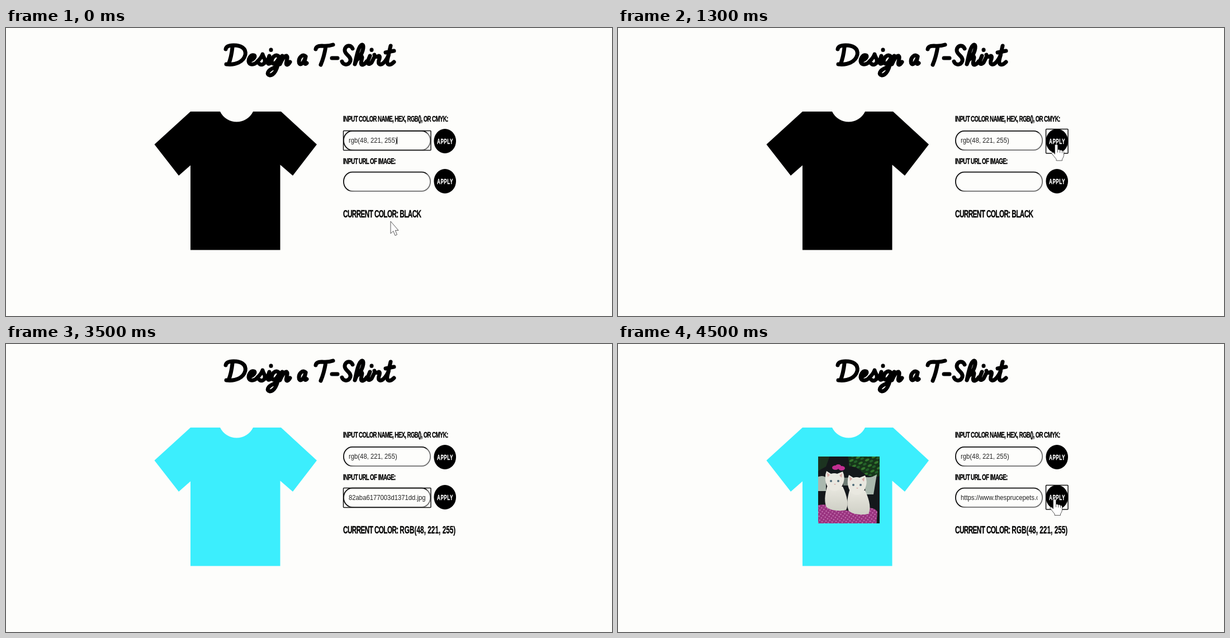
Recreate the animation shown at these times as an HTML page. Size 1084 by 517 pixels, loop 4.8 s.

```html
<!DOCTYPE html>
<html lang="en">
<head>
<meta charset="utf-8">
<title>Design a T-Shirt</title>
<style>
  html, body { margin: 0; width: 100%; height: 100%; overflow: hidden; background: #fdfdfb; }
  svg { display: block; width: 1084px; height: 517px; }
  text { white-space: pre; }
  .display { font: bold 15.5px "Liberation Sans", Arial, sans-serif; letter-spacing: -.06em; stroke: #000; stroke-width: .35; }
  .display .status { font-size: 18.85px; }
  .display .digits { letter-spacing: .005em; }
  .apply { font: bold 13px "Liberation Sans", Arial, sans-serif; letter-spacing: .07em; fill: #fff; stroke: #fff; stroke-width: .35; text-anchor: middle; }
  .value { font: 12.5px "Liberation Sans", Arial, sans-serif; fill: #222; }
  .lettering { fill: none; stroke: #000; stroke-width: 7; stroke-linecap: round; stroke-linejoin: round; }
  .field { fill: none; stroke: url(#inset); stroke-width: 1.8; }
  .focus { fill: none; stroke: #111; stroke-width: 1.5; }
  .caret { stroke: #000; stroke-width: 1; }
  .pointer { fill: #fff; stroke: #444; stroke-width: .9; stroke-linejoin: round; }
</style>
</head>
<body>
<svg viewBox="0 0 1084 517">
  <defs>
    <linearGradient id="inset" x1="0" y1="0" x2="1" y2="1">
      <stop offset=".5" stop-color="#0c0c0c"/>
      <stop offset=".56" stop-color="#6c6c6c"/>
    </linearGradient>
    <linearGradient id="fur" x1="0" y1="0" x2="0" y2="1">
      <stop offset="0" stop-color="#e9e8e0"/>
      <stop offset="1" stop-color="#cfd0c6"/>
    </linearGradient>
    <pattern id="weave" width="5" height="5" patternUnits="userSpaceOnUse" patternTransform="rotate(35)">
      <rect width="5" height="5" fill="#99337f"/>
      <circle cx="2" cy="2" r="1.200" fill="#c673b2"/>
    </pattern>
    <pattern id="leaves" width="13" height="11" patternUnits="userSpaceOnUse" patternTransform="rotate(-25)">
      <rect width="13" height="11" fill="#16351a"/>
      <ellipse cx="4" cy="3" rx="4" ry="2" fill="#347a2e"/>
      <ellipse cx="10" cy="8" rx="3.500" ry="2" fill="#23612a"/>
    </pattern>
    <filter id="soft"><feGaussianBlur stdDeviation=".7"/></filter>
    <clipPath id="photoClip"><rect x="358" y="202" width="110" height="120"/></clipPath>
    <clipPath id="valueClip"><rect x="612" y="260" width="138.500" height="32"/></clipPath>
  </defs>

  <g class="lettering" role="img" aria-label="Design a T-Shirt">
    <path d="M405 35Q403 53 398 65M393 38Q394 31 407 31C421 31 430 37 428 48C425 61 410 67 394 65"/>
    <path d="M435 59C443 57 448 50 443 49C438 48 434 54 434 60C435 67 444 67 450 60"/>
    <path d="M450 60Q457 53 459 47C460 53 466 57 462 63C459 67 455 66 453 64M462 63Q467 61 470 55"/>
    <path d="M471 50L468 60Q468 68 475 61M474 39v.5"/>
    <path d="M488 51C482 46 475 53 475 60C476 67 484 65 489 52C487 67 483 84 472 85C465 84 468 76 478 72Q485 69 489 63"/>
    <path d="M494 50L490 65Q497 49 502 50C506 53 498 65 503 66Q506 65 508 61"/>
    <path d="M536 51C530 46 524 53 524 60C524 68 531 67 536 52L534 60Q534 67 538 63"/>
    <path d="M554 38Q555 32 565 32Q577 33 585 30M572 33Q569 52 563 66M583 54H593"/>
    <path d="M620 37C617 29 607 31 606 39C605 48 618 50 616 59C613 68 603 67 601 60"/>
    <path d="M627 58C638 48 642 31 637 30C631 31 627 50 624 65C629 51 636 47 637 53C636 59 633 66 638 66Q642 65 645 60"/>
    <path d="M651 50L647 60Q647 68 654 62L659 52M654 39v.5"/>
    <path d="M659 48Q661 54 667 50Q670 51 667 58Q665 67 672 65Q678 62 684 50"/>
    <path d="M688 32L682 58Q681 68 689 65Q692 63 694 61M679 44Q688 42 694 41"/>
  </g>

  <path id="shirt" d="M330 150H383A32.800 32.800 0 0 0 442 150H492L556 209L513 265L490.500 245.500V398.500H330V246.500L309 265L265.500 209Z"/>

  <g clip-path="url(#photoClip)" data-on="4500 4800">
    <path fill="#14181b" d="M358 202h110v120h-110z"/>
    <g filter="url(#soft)">
      <path fill="url(#leaves)" d="M411 198h62v38q-24 6-36-6t-23-10z"/>
      <path fill="#1c3320" d="M354 198h26l-8 22-18 10z"/>
      <g fill="#c22f92">
        <ellipse cx="389" cy="222" rx="6" ry="4"/>
        <ellipse cx="400" cy="223" rx="6" ry="4"/>
        <ellipse cx="394" cy="219" rx="5" ry="3"/>
      </g>
      <path fill="#aab8ae" d="M354 240q12-6 18 0v24h-18zM440 238q12 4 23-4l-6 36h-14z"/>
      <path fill="#6f7c74" d="M403 240h10v14h-10z"/>
      <path fill="url(#weave)" d="M354 290q18-5 32 4 34 10 58 1 14-3 20 6l-2 26h-108z"/>
      <g id="kitten">
        <path fill="url(#fur)" d="M374 256q-7 24-1 37 13 9 35 5 7-14-6-42z"/>
        <path fill="#e9e8e0" d="M371 245q-1-10 2-17l8 5q6-2 11 0l10-4q4 8 2 17-4 17-17 18-13-1-16-19z"/>
        <path fill="#d6aaa6" d="M374 231l5 4-4 4zM401 232l-5 4 4 4zM386 251h4l-2 2z"/>
        <g fill="#4e6a78"><circle cx="381" cy="246" r="2"/><circle cx="394" cy="246" r="2"/></g>
      </g>
      <use href="#kitten" x="40" y="7"/>
    </g>
  </g>

  <g transform="translate(603 0) scale(.622 1)" class="display">
    <text y="168.500">INPUT COLOR NAME, HEX, RGB(), OR CMYK:</text>
    <text y="244.500">INPUT URL OF IMAGE:</text>
    <text y="340.500" class="status" data-on="0 1500">CURRENT COLOR: BLACK</text>
    <text y="340.500" class="status" data-on="1500 4800">CURRENT COLOR: <tspan class="digits">RGB(48, 221, 255)</tspan></text>
  </g>

  <rect class="field" x="603.900" y="184.900" width="155.200" height="34.200" rx="15.500" ry="17"/>
  <rect class="field" x="603.900" y="258.600" width="155.200" height="34.200" rx="15.500" ry="17"/>
  <ellipse cx="785.200" cy="203" rx="19.800" ry="22"/>
  <ellipse cx="785.200" cy="275" rx="19.800" ry="22"/>
  <g transform="translate(785.500 0) scale(.622 1)" class="apply">
    <text y="207.600">APPLY</text>
    <text y="279.600">APPLY</text>
  </g>

  <g transform="translate(613 0) scale(.905 1)" class="value">
    <text y="206.300">rgb(48, 221, 255)</text>
  </g>
  <g clip-path="url(#valueClip)">
    <g transform="translate(613 0) scale(.905 1)" class="value">
      <text y="279.800" data-on="2800 4300">82aba6177003d1371dd.jpg</text>
      <text y="279.800" data-on="4300 4800">https://www.thesprucepets.com</text>
    </g>
  </g>

  <path class="caret" d="M699.500 195.500v13" data-on="0 800"/>
  <path class="caret" d="M613.500 269v13.500" data-on="2600 2800"/>
  <path class="caret" d="M750.500 269v13.500" data-on="2800 3500"/>

  <rect class="focus" x="603.500" y="184.500" width="156.500" height="35" rx="1" data-on="0 1300"/>
  <rect class="focus" x="765.500" y="181.500" width="39.500" height="43.500" rx="1" data-on="1300 2600"/>
  <rect class="focus" x="603.500" y="258.500" width="156.500" height="35" rx="1" data-on="2600 4300"/>
  <rect class="focus" x="765.500" y="253.500" width="39.500" height="43.500" rx="1" data-on="4300 4800"/>

  <path id="arrow" class="pointer" d="M0 0V22L4.800 17.500L8 25.500L11.500 24L8.300 16.300H14Z"/>
  <g id="hand" class="pointer">
    <path d="M-2.500 2Q0-1.500 2.500 2V10Q5 8.500 6.500 11Q9 9.500 10.500 12Q13 11 13.500 14V20Q13 24 10.500 27V29.500H0V27Q-4 22-8.500 16.500Q-7.500 13.500-4.500 15.500L-2.500 18Z"/>
    <path fill="none" d="M2.500 10v5M6.500 11v4.500M10.500 12v4"/>
  </g>
</svg>
<script>
  const LOOP = 4800;
  const byId = id => document.getElementById(id);
  const shirt = byId('shirt');
  const pointers = { arrow: byId('arrow'), hand: byId('hand') };

  // time, pointer, tip x, tip y
  const moves = [
    [0, 'arrow', 688, 347],
    [100, 'arrow', 692, 343],
    [200, 'arrow', 704, 331],
    [300, 'arrow', 722, 309],
    [400, 'arrow', 743, 279],
    [500, 'arrow', 763, 246],
    [600, 'hand', 776, 221],
    [700, 'hand', 779, 213],
    [800, 'hand', 782, 210],
    [900, 'hand', 784, 208.5],
    [2000, 'hand', 773, 220],
    [2100, null],
    [3800, 'arrow', 758, 266],
    [3900, 'hand', 770, 271],
    [4000, 'hand', 777, 275],
    [4100, 'hand', 781, 278]
  ];

  const timed = [...document.querySelectorAll('[data-on]')].map(el => {
    const [from, to] = el.dataset.on.split(' ').map(Number);
    return { el, from, to };
  });
  const show = (el, on) => { el.style.visibility = on ? 'visible' : 'hidden'; };

  function draw(t) {
    for (const { el, from, to } of timed) show(el, t >= from && t < to);
    shirt.setAttribute('fill', t < 1500 ? '#000' : '#3ceefd');

    const [, kind, x, y] = moves.filter(move => move[0] <= t).pop();
    for (const [name, el] of Object.entries(pointers)) {
      show(el, name === kind);
      if (name === kind) el.setAttribute('transform', `translate(${x} ${y})`);
    }
  }

  const start = performance.now();
  function tick() {
    draw((performance.now() - start) % LOOP);
    requestAnimationFrame(tick);
  }
  tick();
</script>
</body>
</html>
```
